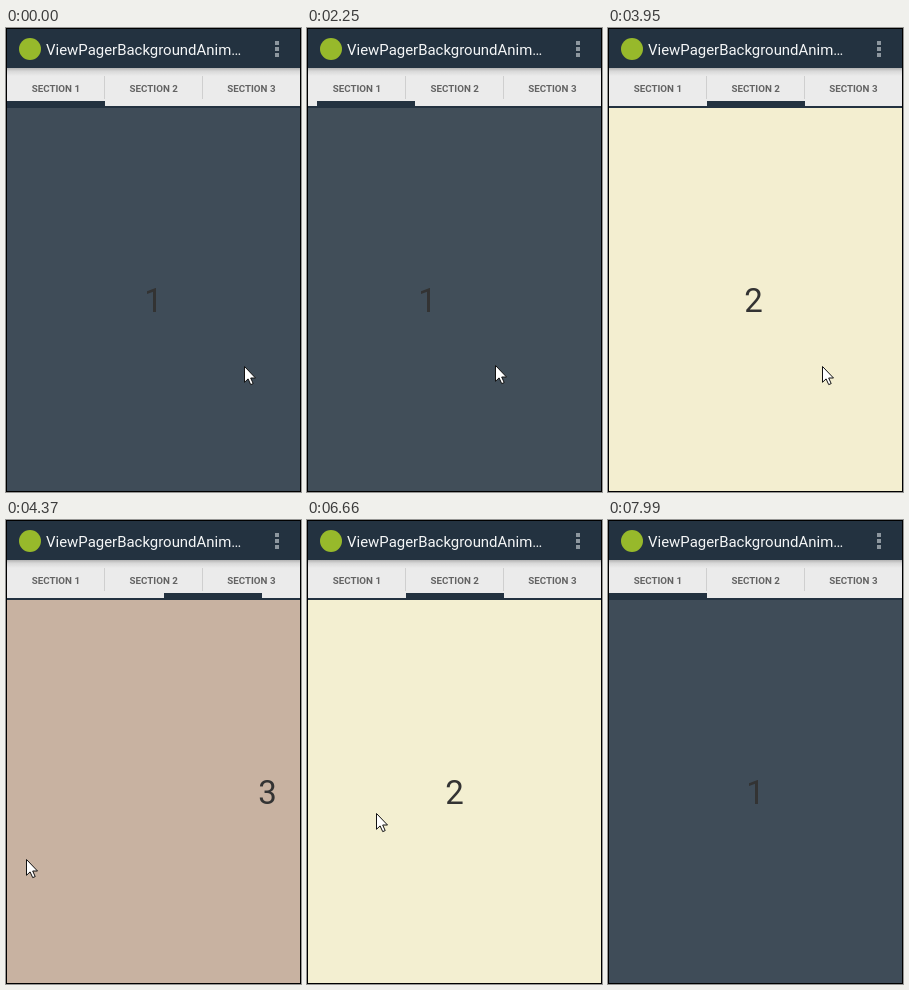
An HTML page that plays this animation: 295x464 px, repeating every 8450 ms.

```html
<!DOCTYPE html>
<html lang="en">
<head>
<meta charset="utf-8">
<title>View pager</title>
<style>
  html, body { margin: 0; width: 100%; height: 100%; overflow: hidden; background: #000; }
  svg { display: block; width: 295px; height: 464px; }
  text { font-family: Roboto, "Open Sans", sans-serif; }
  .title { font-size: 14.95px; fill: #f4f6f7; }
  .tabs text { font-size: 9.75px; font-weight: 700; fill: #636363; text-anchor: middle; }
  .pages text { font-size: 33px; fill: #333; text-anchor: middle; }
</style>
</head>
<body>
<svg viewBox="0 0 295 464">
  <defs>
    <clipPath id="screen"><rect x="1" y="1" width="293" height="462"/></clipPath>
    <linearGradient id="shade" x2="0" y2="1">
      <stop offset="0" stop-color="#000" stop-opacity=".24"/>
      <stop offset=".4" stop-color="#000" stop-opacity=".08"/>
      <stop offset="1" stop-color="#000" stop-opacity="0"/>
    </linearGradient>
  </defs>
  <rect width="295" height="464"/>
  <g clip-path="url(#screen)">
    <rect id="back" x="1" y="80" width="293" height="383"/>
    <g class="pages">
      <text y="284">1</text>
      <text y="284">2</text>
      <text y="284">3</text>
    </g>

    <rect x="1" y="1" width="293" height="39" fill="#233240"/>
    <circle cx="24" cy="21" r="11" fill="#97b92b"/>
    <text class="title" x="40" y="27">ViewPagerBackgroundAnim…</text>
    <path d="M269 13h4v4h-4zM269 19h4v4h-4zM269 25h4v4h-4z" fill="#8d979f"/>

    <rect x="1" y="40" width="293" height="38" fill="#ebebeb"/>
    <rect x="1" y="40" width="293" height="8" fill="url(#shade)"/>
    <path d="M98.5 48v23M196.5 48v23" stroke="#cfcfcf"/>
    <g class="tabs">
      <text x="49.9" y="64">SECTION 1</text>
      <text x="147.7" y="64">SECTION 2</text>
      <text x="245.4" y="64">SECTION 3</text>
    </g>
    <rect x="1" y="78" width="293" height="2" fill="#233240"/>
    <rect id="bar" y="73" width="98" height="5" fill="#233240"/>

    <path id="cursor" d="M.5 .5V16.3L4.1 12.9L6.7 18.6L9.2 17.6L6.7 12H11.5Z"
          fill="#fff" stroke="#111"/>
  </g>
</svg>
<script>
const LOOP = 8450, WIDTH = 293, TAB = 97.67;
const COLORS = [[63, 76, 88], [243, 239, 209], [191, 165, 150]];

// Screen refreshes come in evenly spaced runs: [first, last, count]
const RUNS = [
  [1590, 2520, 8], [2640, 3660, 9], [3950, 4930, 8], [5210, 6230, 9],
  [6380, 6660, 2], [6660, 7690, 8], [7840, 7990, 2]];

// S-shaped page moves: [middle, softness, distance]
const SWIPES = [[2200, 45, .12], [2708, 60, .88], [4336, 75, 1], [5684, 75, -1], [7110, 65, -1]];

// Turning points of the pointer: [time, x, y]
const TURNS = [
  [1460, 238, 338], [2254, 188, 337], [2780, -16, 338], [3660, 214, 338], [3950, 214, 338],
  [4510, -16, 339], [4930, 66, 328], [5210, 66, 326], [5850, 288, 326], [6230, 61, 295],
  [6380, 57, 294], [6660, 69, 293], [7250, 296, 335], [7690, 266, 435], [7840, 266, 440], [7990, 266, 470]];

const $ = id => document.getElementById(id);
const back = $("back"), bar = $("bar"), cursor = $("cursor");
const numbers = document.querySelectorAll(".pages text");
const mix = (a, b, k) => a + (b - a) * k;
const smooth = k => k * k * (3 - 2 * k);

// Time of the latest refresh; each comes a little early in its slot.
function refreshed(ms) {
  const run = RUNS.filter(r => r[0] <= ms).pop();
  if (!run) return 0;
  const [first, last, count] = run, step = (last - first) / (count - 1);
  return first + step * Math.min(count - 1, Math.floor((ms - first) / step + .17));
}

const pageAt = t => SWIPES.reduce((sum, [mid, soft, d]) => sum + d / (1 + Math.exp((mid - t) / soft)), 0);

function pointerAt(t) {
  const i = TURNS.findIndex(turn => turn[0] >= t);
  if (i < 1) return TURNS[0].slice(1);
  const [t0, x0, y0] = TURNS[i - 1], [t1, x1, y1] = TURNS[i];
  const k = smooth((t - t0) / (t1 - t0));
  return [mix(x0, x1, k), mix(y0, y1, k)];
}

// Ease in and out across the whole three-colour range.
function background(page) {
  const f = 1 - Math.cos(page / 2 * Math.PI);
  const i = Math.min(1, Math.floor(f));
  return `rgb(${COLORS[i].map((v, n) => Math.round(mix(v, COLORS[i + 1][n], f - i)))})`;
}

function draw(ms) {
  const t = refreshed(ms), page = pageAt(t), [x, y] = pointerAt(t);
  back.setAttribute("fill", background(page));
  bar.setAttribute("x", Math.round(1 + page * TAB));
  numbers.forEach((el, i) => el.setAttribute("x", 147.4 + Math.round((i - page) * WIDTH)));
  cursor.setAttribute("transform", `translate(${Math.round(x)} ${Math.round(y)})`);
}

const start = performance.now();
function tick() {
  draw((performance.now() - start) % LOOP);
  requestAnimationFrame(tick);
}
tick();
</script>
</body>
</html>
```
